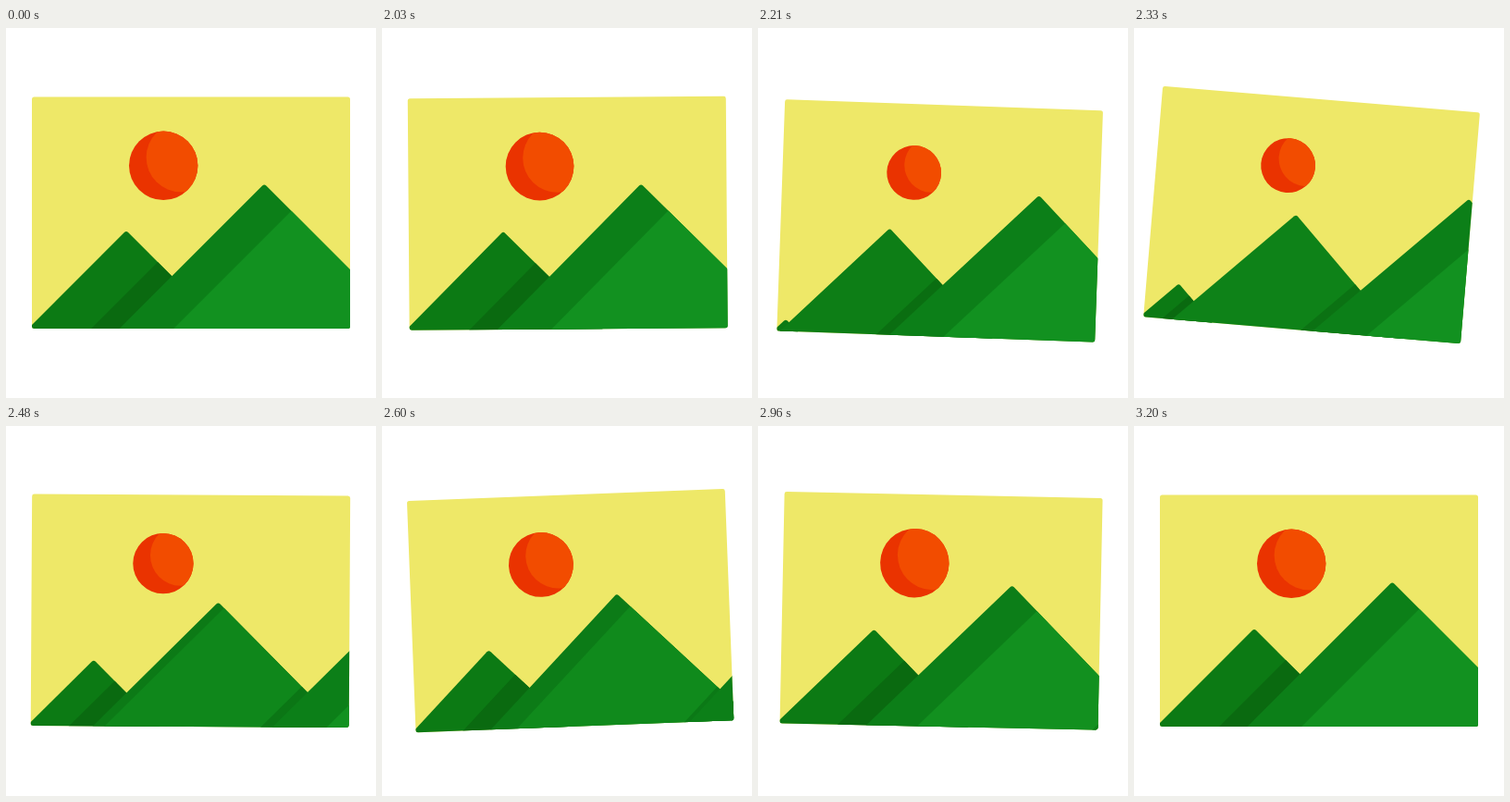
Recreate the animation shown at these times as an HTML page with a canvas. Size 400 by 400 pixels, loop 3230 ms.

```html
<!DOCTYPE html>
<html lang="en">
<head>
<meta charset="utf-8">
<title>Swinging landscape</title>
<style>
  html, body { margin: 0; width: 100%; height: 100%; overflow: hidden; background: #fff; }
  canvas { display: block; width: 400px; height: 400px; }
</style>
</head>
<body>
<canvas id="stage"></canvas>
<script>
const LOOP = 3230, START = 2000, END = 3200, HOLD = 2030, STEP = 30;
const CARD = { x: 28, y: 74.5, w: 344, h: 250.5, r: 2.5 };
const PIVOT = { x: 200, y: 105 };
const SUN = { x: 170.2, y: 148.8, r: 37.2 };
const SKY = '#eee868';
const NEAR = { strip: [12, 127, 24], main: [18, 145, 32], shade: [12, 127, 24] };
const FAR = { strip: [11, 115, 19], main: [12, 122, 20], shade: [10, 106, 16] };

const canvas = document.getElementById('stage');
const ctx = canvas.getContext('2d');
const ratio = window.devicePixelRatio || 1;
canvas.width = canvas.height = 400 * ratio;

const mix = (a, b, k) => a + (b - a) * k;
const clamp = v => Math.min(1, Math.max(0, v));
const progress = (t, from, to) => clamp((t - from) / (to - from));
const smooth = u => u * u * (3 - 2 * u);
const mixColor = (a, b, k) => `rgb(${a.map((v, i) => Math.round(mix(v, b[i], k)))})`;

// Ease along a cubic bezier with control points (x1, 0) and (x2, 1).
function bezier(u, x1, x2) {
  let lo = 0, hi = 1;
  for (let i = 0; i < 24; i++) {
    const s = (lo + hi) / 2, n = 1 - s;
    const x = 3 * s * n * n * x1 + 3 * s * s * n * x2 + s * s * s;
    if (x < u) lo = s; else hi = s;
  }
  return smooth((lo + hi) / 2);
}

function keyed(t, keys) {
  if (t <= keys[0][0]) return keys[0][1];
  for (let i = 1; i < keys.length; i++) {
    const [t0, v0] = keys[i - 1], [t1, v1] = keys[i];
    if (t < t1) return mix(v0, v1, smooth(progress(t, t0, t1)));
  }
  return keys[keys.length - 1][1];
}

const SWING = [[2000, 0], [2100, -2], [2300, 5], [2600, -2.2], [2900, 1.3], [3200, 0]];
const DROP = [[2000, 0], [2200, 8.8], [2400, 0]];

function disc(x, y, r, color) {
  ctx.beginPath();
  ctx.arc(x, y, r, 0, 2 * Math.PI);
  ctx.fillStyle = color;
  ctx.fill();
}

// Fills everything beyond the 45 degree line that leaves the right slope at the given offset.
function beyond(x, y, offset, color) {
  const px = x + offset, py = y + offset, d = 400;
  ctx.beginPath();
  ctx.moveTo(px + d, py - d);
  ctx.lineTo(px - d, py + d);
  ctx.lineTo(px + d, py + d);
  ctx.fillStyle = color;
  ctx.fill();
}

function mountain({ x, y, strip = 0, shade = Infinity, colors }) {
  const d = 400;
  ctx.save();
  ctx.beginPath();
  ctx.moveTo(x - d, y + d);
  ctx.arcTo(x, y, x + d, y + d, 3);
  ctx.lineTo(x + d, y + d);
  ctx.closePath();
  ctx.fillStyle = strip > 0 ? colors.strip : colors.main;
  ctx.fill();
  ctx.clip();
  if (strip > 0) beyond(x, y, strip, colors.main);
  if (shade < 200) beyond(x, y, shade, colors.shade);
  ctx.restore();
}

function palette(k) {
  const colors = {};
  for (const part in FAR) colors[part] = mixColor(FAR[part], NEAR[part], k);
  return colors;
}

function drawSun(t) {
  const shrink = t < 2250
    ? smooth(progress(t, START, 2250))
    : 1 - bezier(progress(t, 2250, 2950), 0.25, 0.35);
  const r = SUN.r * (1 - 0.225 * shrink);
  ctx.save();
  disc(SUN.x, SUN.y, r, '#ea3300');
  ctx.clip();
  disc(SUN.x + 19, SUN.y - 9, r * 1.01, '#f24c00');
  ctx.restore();
}

function drawMountains(t) {
  const u = progress(t, START, END);
  const slide = bezier(u, 0.394, 0.136);
  const rise = bezier(u, 0.2, 0.42);
  const stripGrowth = 1 - Math.pow(1 - progress(t, 2400, END), 2.3);

  mountain({
    x: mix(26, 130, slide), y: mix(323, 219, slide),
    shade: 34 * slide, colors: palette(0)
  });
  mountain({
    x: mix(130, 279.2, slide), y: mix(219, 168.4, rise),
    strip: 29.3 * stripGrowth, shade: mix(34, 134, rise), colors: palette(rise)
  });
  mountain({
    x: mix(279.2, 528, slide), y: 168.4,
    strip: 29.3, colors: palette(1)
  });
}

function draw(t) {
  ctx.setTransform(ratio, 0, 0, ratio, 0, 0);
  ctx.fillStyle = '#fff';
  ctx.fillRect(0, 0, 400, 400);

  ctx.save();
  ctx.translate(PIVOT.x, PIVOT.y + keyed(t, DROP));
  ctx.rotate(keyed(t, SWING) * Math.PI / 180);
  ctx.translate(-PIVOT.x, -PIVOT.y);

  ctx.beginPath();
  ctx.roundRect(CARD.x, CARD.y, CARD.w, CARD.h, CARD.r);
  ctx.fillStyle = SKY;
  ctx.fill();
  ctx.clip();
  drawSun(t);
  drawMountains(t);
  ctx.restore();
}

function tick() {
  const t = performance.now() % LOOP;
  draw(t < HOLD ? 0 : HOLD + Math.floor((t - HOLD) / STEP) * STEP);
  requestAnimationFrame(tick);
}
tick();
</script>
</body>
</html>
```
